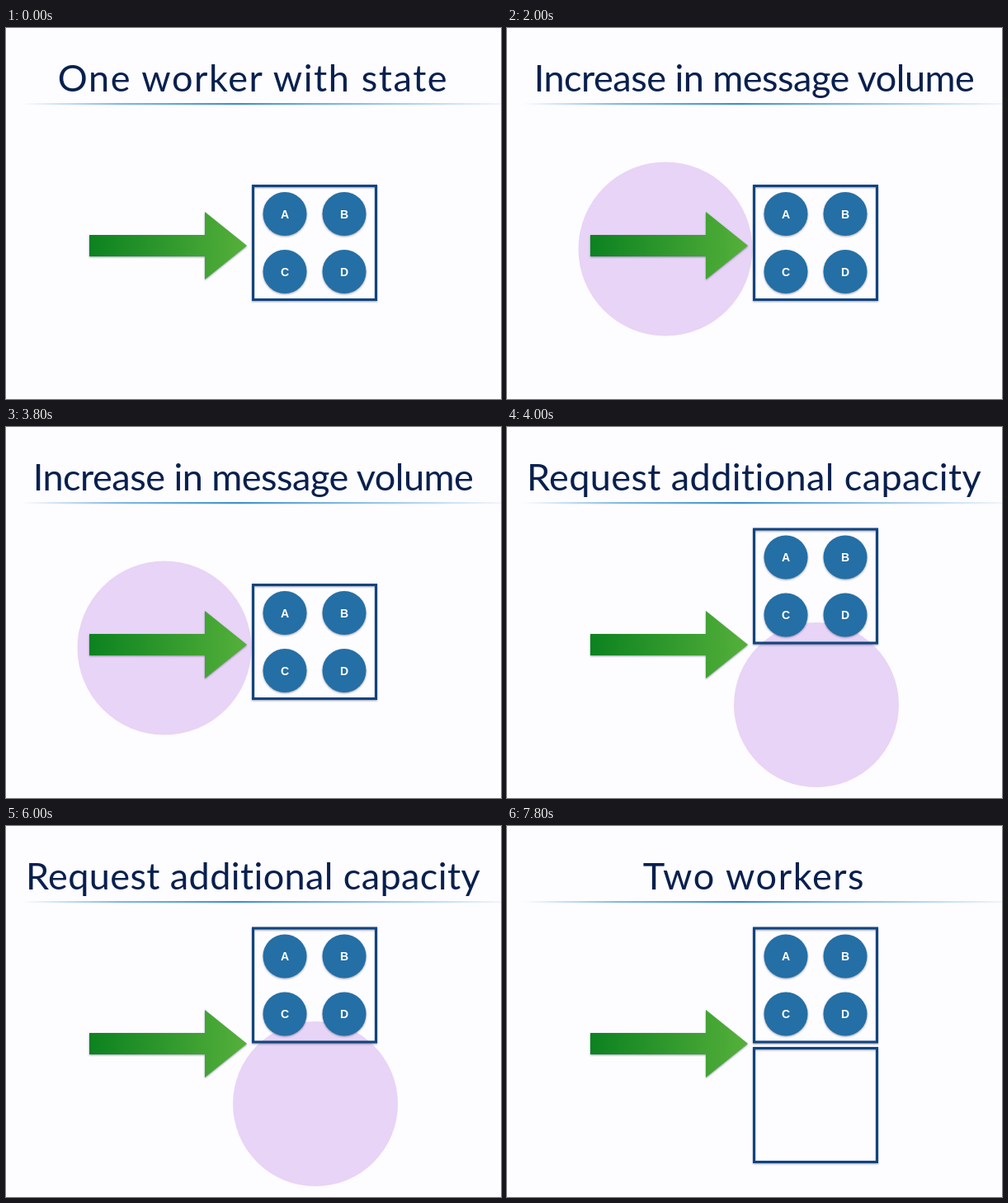
These frames come from a looping animation (600x450 px, 8 s). An HTML page:

```html
<!DOCTYPE html>
<html lang="en">
<head>
<meta charset="utf-8">
<title>Scaling workers</title>
<style>
  html, body { margin: 0; width: 100%; height: 100%; overflow: hidden; background: #fdfcff; }
  svg { display: block; width: 100vw; height: 100vh; }
  text { text-anchor: middle; }
  #title { font: 45px Lato, sans-serif; fill: #08204e; }
  .state { font: bold 14px "Liberation Sans", Arial, sans-serif; fill: #fff; }
  .box { fill: none; stroke: #11447f; stroke-width: 3; }
  .disc { fill: #246fa5; }
  .shadow { filter: drop-shadow(0 1px 1px rgba(20, 40, 70, .45)); }
</style>
</head>
<body>
<svg viewBox="0 0 600 450">
  <defs>
    <linearGradient id="ruleFade">
      <stop offset="0" stop-color="#5aa5da" stop-opacity="0"/>
      <stop offset=".2" stop-color="#5aa5da" stop-opacity=".75"/>
      <stop offset=".45" stop-color="#3f8fcd"/>
      <stop offset=".7" stop-color="#5aa5da" stop-opacity=".7"/>
      <stop offset="1" stop-color="#5aa5da" stop-opacity=".08"/>
    </linearGradient>
    <linearGradient id="arrowFill">
      <stop offset="0" stop-color="#0c8220"/>
      <stop offset="1" stop-color="#55b03a"/>
    </linearGradient>
  </defs>
  <text id="title" x="299.5" y="77"></text>
  <rect x="20" y="91" width="580" height="2.2" fill="url(#ruleFade)"/>
  <circle id="highlight" fill="#e8d4f6"/>
  <path class="shadow" fill="url(#arrowFill)" d="M101 251H241V223L292 264L241 305V277H101Z"/>
  <g id="worker" class="shadow"><rect class="box" x="299.5" y="191.5" width="149" height="138"/></g>
  <rect id="secondWorker" class="box shadow" x="299.5" y="269.5" width="149" height="138"/>
</svg>
<script>
const LOOP = 8000;
const slides = [
  { start: 0, title: "One worker with state", tracking: 1.6, lift: 0 },
  { start: 1800, title: "Increase in message volume", tracking: -0.5, lift: 0,
    highlight: { cx: 192, cy: 268, r: 105.5 } },
  { start: 4000, title: "Request additional capacity", tracking: 0.4, lift: 67.5,
    highlight: { cx: 375, cy: 337, r: 100 } },
  { start: 6200, title: "Two workers", tracking: 1.6, lift: 67.5, second: true }
];
const byId = id => document.getElementById(id);
const [title, highlight, worker, secondWorker] =
  ["title", "highlight", "worker", "secondWorker"].map(byId);

function add(parent, tag, attributes) {
  const node = document.createElementNS("http://www.w3.org/2000/svg", tag);
  setAttributes(node, attributes);
  return parent.appendChild(node);
}

function setAttributes(node, attributes) {
  for (const [name, value] of Object.entries(attributes)) node.setAttribute(name, value);
}

[..."ABCD"].forEach((letter, i) => {
  const x = 338 + 72 * (i % 2);
  const y = 225.5 + 70 * Math.floor(i / 2);
  add(worker, "circle", { class: "disc", cx: x, cy: y, r: 26.5 });
  add(worker, "text", { class: "state", x, y: y + 5 }).textContent = letter;
});

function show(slide) {
  title.textContent = slide.title;
  title.style.letterSpacing = slide.tracking + "px";
  setAttributes(highlight, slide.highlight || { r: 0 });
  worker.setAttribute("transform", `translate(0 ${-slide.lift})`);
  secondWorker.style.display = slide.second ? "" : "none";
}

let current;
const origin = performance.now();
function tick() {
  const time = (performance.now() - origin) % LOOP;
  const slide = slides.findLast(s => s.start <= time);
  if (slide !== current) show(current = slide);
  requestAnimationFrame(tick);
}
tick();
</script>
</body>
</html>
```
